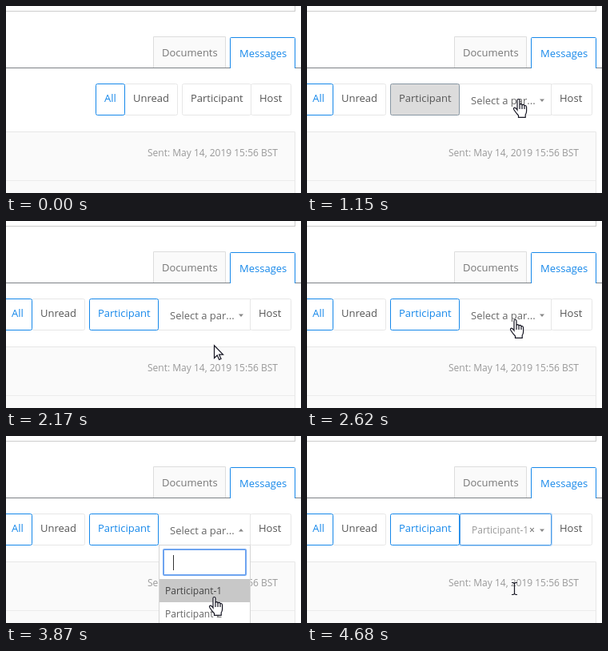
These frames come from a looping animation (369 px wide and 234 px high, 5130 ms). An HTML page with a canvas:

```html
<!DOCTYPE html>
<html lang="en">
<head>
<meta charset="utf-8">
<title>Message filter</title>
<style>
  html, body { margin: 0; width: 100%; height: 100%; overflow: hidden; background: #fff; }
  canvas { display: block; }
</style>
</head>
<body>
<canvas width="369" height="234"></canvas>
<script>
const ctx = document.querySelector('canvas').getContext('2d');
const LOOP = 5130;
const BLUE = '#1688ea', GREY = '#e7e7e7', INK = '#555';

// Pointer stops: time, x, y of the hotspot
const STOPS = [
  [50, 277, 222], [530, 263, 122], [570, 263, 122], [650, 263, 116],
  [1150, 263, 116], [1550, 261, 186], [1930, 261, 186], [2420, 259, 123],
  [3000, 259, 123], [3420, 259, 201], [4119, 259, 201], [4180, 255, 200],
  [4520, 255, 200], [4680, 259, 191], [LOOP, 259, 191]
];
const CLICKS = [[790, 910], [2550, 2620], [3920, 4000]];

const HAND = new Path2D('M0 14V2Q0 .5 1.5 .5T3 2V8Q3 6.6 4.4 6.6T6 8.3Q6.2 7.3 7.5 7.4T9 9.1' +
  'Q9.3 8.4 10.3 8.5T11.6 10.5V15.5Q11.6 18 10.2 20V23.3H1.5V21Q-1.5 18 -4 14' +
  'Q-5.2 11.8 -3.6 11.2Q-2.2 10.9 0 14ZM3 8V13M6 8.3V13M9 9.1V13');
const ARROW = new Path2D('M.5 .8V16.5L4.2 13L6.7 18.5L9 17.5L6.6 12.2H11.5Z');
const IBEAM = new Path2D('M-3 -7.5H-1L.5 -6.5L2 -7.5H4M.5 -6.5V6.5M-3 7.5H-1L.5 6.5L2 7.5H4');

function text(label, x, y, color = INK, size = 13) {
  ctx.font = `${size}px "Open Sans", sans-serif`;
  ctx.fillStyle = color;
  ctx.fillText(label, x, y);
}

function rect(x, y, w, h, color) {
  ctx.fillStyle = color;
  ctx.fillRect(x, y, w, h);
}

function box(x, y, w, h, border, fill = '#fff', radius = 2, weight = 1) {
  ctx.beginPath();
  ctx.roundRect(x + weight / 2, y + weight / 2, w - weight, h - weight, radius);
  ctx.fillStyle = fill;
  ctx.fill();
  ctx.lineWidth = weight;
  ctx.strokeStyle = border;
  ctx.stroke();
}

function button(label, x, w, border = GREY, color = INK, fill = '#fff') {
  box(x, 97, w, 40, border, fill);
  text(label, x + 11, 120, color);
}

function pointerAt(t) {
  const i = STOPS.findIndex(stop => stop[0] > t);
  if (i < 1) return null;
  const [t0, x0, y0] = STOPS[i - 1], [t1, x1, y1] = STOPS[i];
  const k = (t - t0) / (t1 - t0);
  return { x: Math.round(x0 + (x1 - x0) * k), y: Math.round(y0 + (y1 - y0) * k) };
}

function drawPage() {
  rect(0, 0, 369, 234, '#fff');
  rect(0, 6, 362, 1, '#ccc');
  rect(361, 0, 1, 6, '#ccc');

  box(184, 38, 91, 41, '#ddd', '#fafafa', 0);
  rect(0, 77, 369, 1, '#7d8287');
  rect(184, 78, 91, 2, '#fff');
  box(280, 39, 82, 42, BLUE, '#fff', 1);
  rect(279, 78, 84, 4, '#fff');
  rect(281, 77, 80, 1, '#fff');
  text('Documents', 195, 63, '#777');
  text('Messages', 292, 64, BLUE);

  box(-2, 157, 364, 90, GREY, '#fafafa', 0);
  rect(0, 218, 361, 1, '#ececec');
  text('Sent: May 14, 2019 15:56 BST', 177, 188, '#999', 12);
}

function drawSelect(open, chosen) {
  box(190, 97, 116, 40, GREY, '#fff', 0);
  if (chosen) {
    box(190, 96, 117, 42, '#b5d6f6', '#fff', 2, 2);
    box(191, 97, 115, 40, '#4a9ce8');
    text('Participant-1', 206, 122, '#999', 12);
    text('×', 278, 122, '#666', 12);
  } else {
    text('Select a par...', 205, 123, '#666');
  }
  const tip = open ? 116 : 120, base = open ? 119.5 : 116.5;
  ctx.beginPath();
  ctx.moveTo(291, base);
  ctx.lineTo(297, base);
  ctx.lineTo(294, tip);
  ctx.fillStyle = '#888';
  ctx.fill();
}

function drawDropdown(caret) {
  box(191, 136, 115, 110, '#d5d5d5', '#fff', 0);
  box(196, 141, 105, 34, '#6ea4f0', '#fff', 1, 2);
  if (caret) rect(209, 149, 1, 19, '#333');
  rect(192, 179, 113, 29, '#c8c8c8');
  text('Participant-1', 199, 198, '#444', 12);
  text('Participant-2', 199, 227, '#666', 12);
}

function drawPointer({ x, y }, open) {
  const onItem = open && y > 178, onInput = open && y > 141 && y < 175;
  const onText = onInput || (!open && y > 174 && y < 197);
  ctx.save();
  ctx.translate(x, y);
  ctx.lineWidth = 1.2;
  ctx.strokeStyle = '#151522';
  ctx.fillStyle = '#fff';
  if (onText) {
    ctx.stroke(IBEAM);
  } else {
    const shape = onItem || y < 137 ? HAND : ARROW;
    ctx.fill(shape);
    ctx.stroke(shape);
  }
  ctx.restore();
}

function draw(t) {
  const pointer = pointerAt(t);
  const expanded = t >= 1150;
  const open = t >= 2790 && t < 4120;
  const shift = expanded ? -116 : 0;

  drawPage();
  button('Unread', 148 + shift, 67);
  button('All', 112 + shift, 37, BLUE, BLUE);
  button('Host', expanded ? 305 : 306, expanded ? 52 : 51);
  if (expanded) drawSelect(open, t >= 4120);

  if (t >= 1220) button('Participant', 104, 87, BLUE, BLUE);
  else if (expanded) button('Participant', 104, 87, '#8796a2', INK, '#dcdcdc');
  else if (pointer && pointer.y < 137) button('Participant', 220, 87, '#c8c8c8', INK, '#ebebeb');
  else button('Participant', 220, 87);

  if (open) drawDropdown(t < 3320 || t >= 3870);

  if (!pointer) return;
  drawPointer(pointer, open);
  if (CLICKS.some(([from, to]) => t >= from && t < to)) {
    ctx.beginPath();
    ctx.arc(pointer.x, pointer.y, 12, 0, 2 * Math.PI);
    ctx.fillStyle = 'rgba(255, 255, 0, .47)';
    ctx.fill();
  }
}

const start = performance.now();
function tick() {
  draw((performance.now() - start) % LOOP);
  requestAnimationFrame(tick);
}
tick();
</script>
</body>
</html>
```
